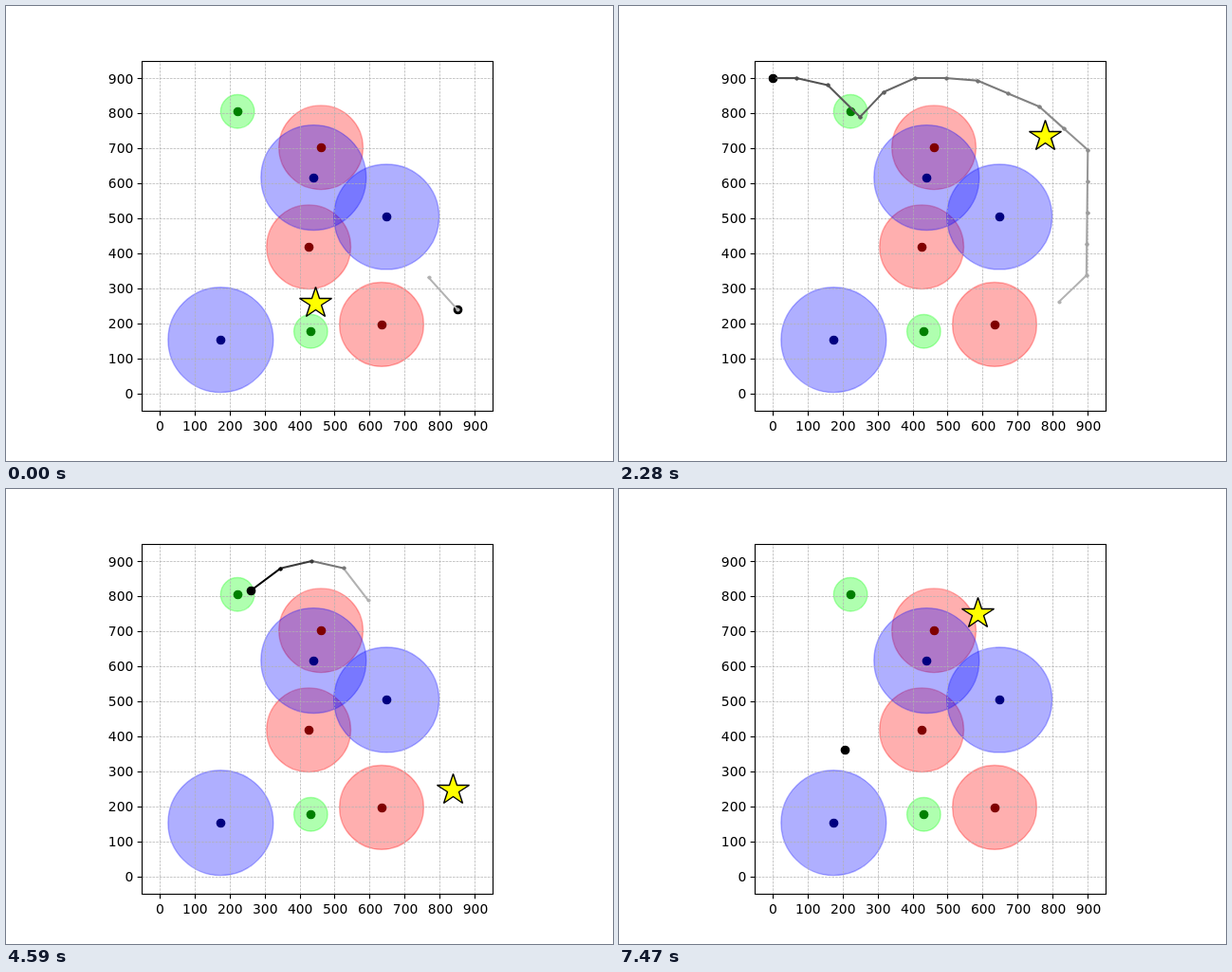
Recreate the animation shown at these times as an HTML page. Size 640 by 480 pixels, loop 7500 ms.

```html
<!DOCTYPE html>
<html lang="en">
<head>
<meta charset="utf-8">
<title>Agent paths</title>
<style>
  html, body { margin: 0; width: 100%; height: 100%; overflow: hidden; background: #fff; }
  svg { display: block; width: 640px; height: 480px; }
  text { font: 13.89px "DejaVu Sans", sans-serif; }
  .zone { fill-opacity: .315; stroke-opacity: .315; stroke-width: 1.39; }
  .grid { stroke: #b0b0b0; stroke-width: .7; stroke-dasharray: 2.57 1.11; }
  .axis { stroke: #000; stroke-width: 1.11; fill: none; }
  .star { fill: #ff0; stroke: #000; stroke-width: 1.39; stroke-linejoin: bevel; }
  #trail { stroke-width: 2.08; stroke-linecap: square; }
</style>
</head>
<body>
<svg viewBox="0 0 640 480">
  <g id="plot"></g>
  <circle id="agent" r="4.86"/>
  <g id="trail"></g>
  <path id="star" class="star"/>
</svg>
<script>
const STEP = 30, STEPS = 250, EPISODE = 50, SPEED = 90, SCALE = .3696;
const $ = id => document.getElementById(id);
const X = x => 161.68 + x * SCALE;
const Y = y => 408.72 - y * SCALE;
const snap = v => Math.floor(v + .5) + .5;

// turning points in plot units; walk() fills in the steps between them
const episodes = [
  { star: [445, 259], turns: [[768, 331], [851, 239], [855, 150], [768, 62], [678, 0], [586, 0],
    [410, 177], [467, 231]] },
  { star: [778, 735], turns: [[818, 262], [896, 337], [900, 695], [761, 819], [585, 893],
    [496, 900], [407, 900], [317, 860], [250, 789], [158, 880], [68, 900], [0, 900]] },
  { star: [309, 307], turns: [[757, 307], [841, 218], [808, 127], [720, 38], [629, 0],
    [540, 66], [360, 245], [318, 292]] },
  { star: [837, 248], turns: [[595, 789], [525, 880], [435, 900], [345, 879], [261, 816],
    [170, 900], [0, 900]] },
  { star: [680, 334], turns: [[508, 123], [430, 177], [57, 545], [0, 633], [0, 815]] },
  { star: [586, 751], turns: [[206, 361]] }
];

const zones = [
  { r: 48, fill: '#0f0', dot: '#008000', at: [[223, 805], [432, 177]] },
  { r: 120, fill: '#f00', dot: '#800000', at: [[461, 702], [426, 418], [634, 197]] },
  { r: 150, fill: '#00f', dot: '#000080', at: [[440, 616], [648, 504], [175, 153]] }
];

// equal steps along each leg, about SPEED long on the faster axis
function walk(turns) {
  const path = [turns[0]];
  for (let i = 1; i < turns.length; i++) {
    const [x, y] = turns[i - 1];
    const dx = turns[i][0] - x, dy = turns[i][1] - y;
    const n = Math.max(1, Math.round(Math.max(Math.abs(dx), Math.abs(dy)) / SPEED));
    for (let k = 1; k <= n; k++) path.push([x + dx * k / n, y + dy * k / n]);
  }
  return path;
}

const line = (x1, y1, x2, y2, attrs) =>
  `<line x1="${x1}" y1="${y1}" x2="${x2}" y2="${y2}" ${attrs}/>`;
const circle = (x, y, r, attrs) => `<circle cx="${x}" cy="${y}" r="${r}" ${attrs}/>`;
const marker = ([x, y], r, fill) => circle(snap(X(x)), snap(Y(y)), r, `fill="${fill}"`);

function drawPlot() {
  const [left, top, right, bottom] = [143.5, 58.5, 513.5, 427.5];
  let areas = '', grid = '', axes = '', dots = '';
  for (const { r, fill, dot, at } of zones) {
    for (const p of at) {
      areas += circle(X(p[0]), Y(p[1]), r * SCALE, `class="zone" fill="${fill}" stroke="${fill}"`);
      dots += marker(p, 4.86, dot);
    }
  }
  for (let v = 0; v <= 900; v += 100) {
    const x = snap(X(v)), y = snap(Y(v));
    grid += line(x, bottom, x, top, 'class="grid"') + line(left, y, right, y, 'class="grid"');
    axes += line(x, bottom, x, bottom + 4.86, 'class="axis"') +
      line(left, y, left - 4.86, y, 'class="axis"') +
      `<text x="${X(v) + .7}" y="448" text-anchor="middle">${v}</text>` +
      `<text x="134.3" y="${Math.round(Y(v) + 5.44)}" text-anchor="end">${v}</text>`;
  }
  axes += `<rect class="axis" x="${left}" y="${top}" width="${right - left}" height="${bottom - top}"/>`;
  $('plot').innerHTML = areas + grid + axes + dots;
}

// corners sit on whole pixels
function starPath(R) {
  const points = Array.from({ length: 10 }, (_, i) => {
    const r = i % 2 ? R * .382 : R, a = i * Math.PI / 5;
    return [r * Math.sin(a), -r * Math.cos(a)].map(Math.round);
  });
  return `M${points.join('L')}Z`;
}

// the trail fades from light grey at the start to black at the newest segment
function trail(path, n) {
  const point = i => path[Math.min(i, path.length - 1)];
  let out = '';
  for (let i = 0; i < n; i++) {
    const grey = Math.round(178 * (1 - i / Math.max(n - 1, 1)));
    const color = `rgb(${grey},${grey},${grey})`;
    const a = point(i), b = point(i + 1);
    if (a !== b) out += line(X(a[0]), Y(a[1]), X(b[0]), Y(b[1]), `stroke="${color}"`);
    out += marker(a, 2.1, color) + marker(b, 2.1, color);
  }
  return out;
}

const place = (id, [x, y]) =>
  $(id).setAttribute('transform', `translate(${snap(X(x))} ${snap(Y(y))})`);

function draw(step) {
  const { star, path } = episodes[Math.floor((step + 1) / EPISODE)];
  const n = (step + 1) % EPISODE;
  place('star', star);
  place('agent', path[Math.min(n, path.length - 1)]);
  $('trail').innerHTML = trail(path, n);
}

for (const e of episodes) e.path = walk(e.turns);
drawPlot();
$('star').setAttribute('d', starPath(17.36));

let shown = -1;
const start = performance.now();
function tick() {
  const step = Math.floor((performance.now() - start) / STEP) % STEPS;
  if (step !== shown) draw(shown = step);
  requestAnimationFrame(tick);
}
tick();
</script>
</body>
</html>
```
